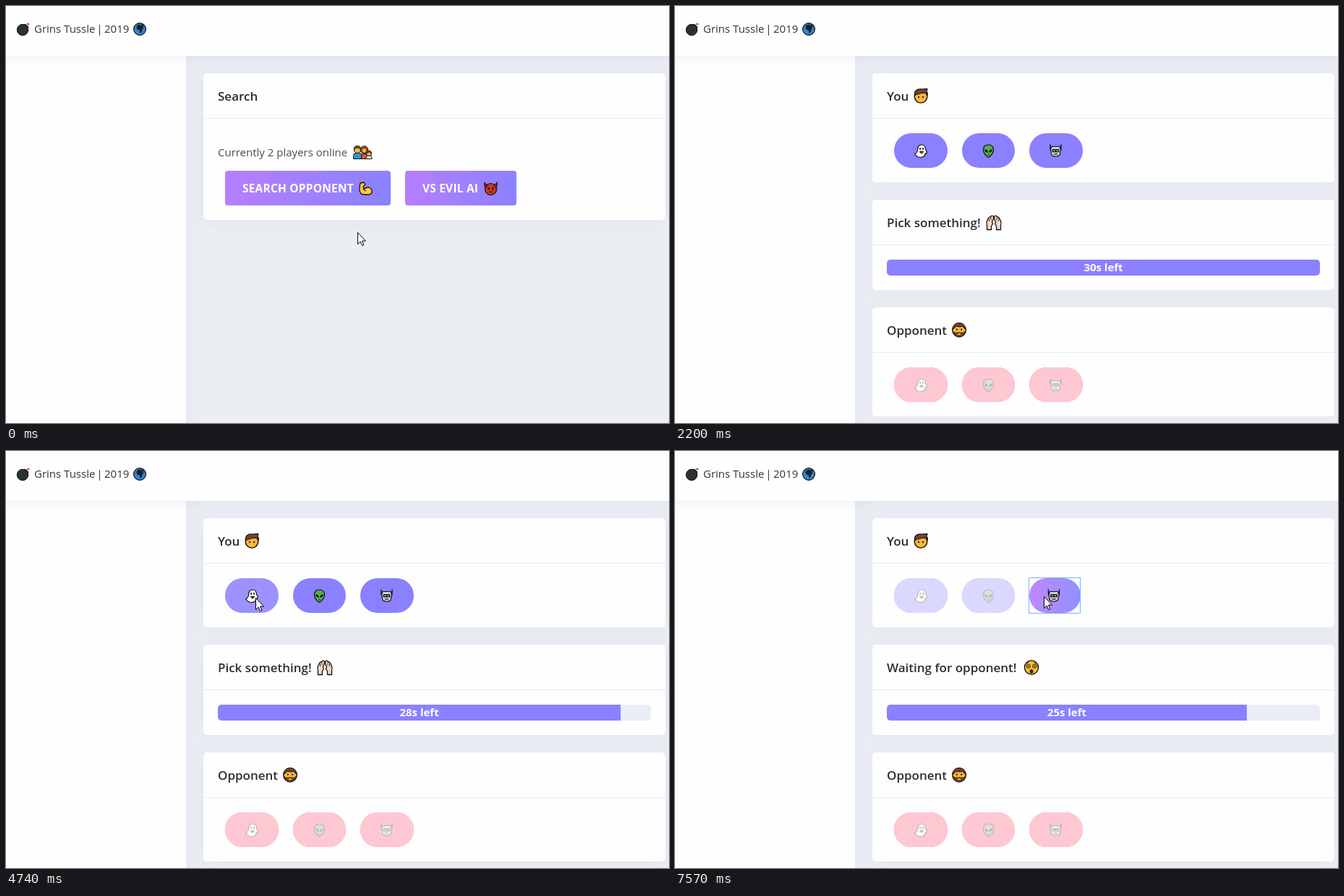
Animation of 917 by 577 pixels, one loop 8000 ms. Source, as an HTML page with a canvas:

```html
<!DOCTYPE html>
<html lang="en">
<head>
<meta charset="utf-8">
<title>Grins Tussle</title>
<style>
html, body { margin: 0; width: 100%; height: 100%; overflow: hidden; background: #fdfdfe; }
canvas { display: block; }
</style>
</head>
<body>
<canvas id="stage" width="917" height="577"></canvas>
<script>
const ctx = document.getElementById('stage').getContext('2d');
const LOOP = 8000, TICK = LOOP / 73;
const FONT = '"Open Sans", "Noto Sans", sans-serif';
const INK = '#111', WHITE = '#fefefe', PURPLE = '#8b80ff', PINK = '#ff4b6c';
const CLICK = 250, START = 1855, PICK = 7200;

const clamp = v => Math.max(0, Math.min(1, v));
const ramp = (t, from, span) => clamp((t - from) / span);

// CSS "ease" curve
function ease(x) {
  let lo = 0, hi = 1;
  for (let i = 0; i < 20; i++) {
    const s = (lo + hi) / 2;
    const bx = 3 * s * (1 - s) ** 2 * .25 + 3 * s * s * (1 - s) * .25 + s ** 3;
    if (bx < x) lo = s; else hi = s;
  }
  return 3 * lo * (1 - lo) ** 2 * .1 + 3 * lo * lo * (1 - lo) + lo ** 3;
}

// ellipse as path data
const o = (x, y, r, h = r) => `M${x - r} ${y}a${r} ${h} 0 1 0 ${2 * r} 0a${r} ${h} 0 1 0 ${-2 * r} 0z`;
const SKIN = '#ffb636', HAIR = '#70452a';

// layers: path, fill, line width, line colour
const EMOJI = {
  bomb: [
    ['M12 3l5 4-2 3-5-4z', '#2d3135', 1], [o(9, 11, 7.7), '#2d3135', 1],
    ['M14.5 5q0-3 3-2.5', 0, 1.2, '#8a5a33'], [o(17, 3, 1.6), '#d9622f']],
  globe: [
    [o(9.5, 9.5, 8.4), '#3186d6', 1.2],
    ['M6 4l4-1 3 2 2 3-2 2-1 4-2 1-1-4-3-1-1-3z', '#17231f'], ['M13 2l3 3-2 1-2-2z', '#17231f']],
  family: [
    ['M1 18.5v-4q0-4 4-4h4q4 0 4 4v4z', '#3192e0', 1], [o(6.5, 6, 4.6), SKIN, 1],
    ['M2 6q-1-5.500 4.500-5.500t4.500 5.500q-2-3-4.500-3t-4.500 3z', HAIR, .7],
    ['M12 18.500v-4q0-3 4-3t5 3v4z', '#e0532c', 1], [o(16, 6, 5.2), '#b3481f', 1], [o(16, 7, 3.3), SKIN, .6],
    ['M18.500 18.500v-2q0-3 4-3t4 3v2z', '#f4f4f4', 1], [o(22.5, 11, 3.6), SKIN, 1],
    ['M19 11q0-4 3.500-4t3.500 4q-3-3-7 0z', HAIR, .5]],
  muscle: [
    ['M2 2l5-1 2 3-3 3 1 4q3-4 7-3 5 2 4 7-1 3-6 3h-5q-5 0-6-6 0-6 1-10z', '#ffc83d', 1.3],
    ['M7 11q1 2 3 2', 0, 1]],
  devil: [
    [o(9.5, 10.5, 8), '#c83a20', 1.2],
    ['M1 .8q0 3 4 3.500l-3 4q-2-4-1-7.500zM18 .8q0 3-4 3.500l3 4q2-4 1-7.500z', '#c83a20', 1.1],
    ['M5 8l3 1.500M14 8l-3 1.500', 0, 1.1],
    [o(6.7, 10.5, 1) + o(12.3, 10.5, 1), INK], ['M7 15q2.500-2 5 0', 0, 1.1]],
  boy: [
    [o(10, 11.3, 8.8), SKIN, 1.4],
    ['M1.500 9.500q-1-9 9-8.500l8.500-.5-1 3q2 3 1 6-1-3-4-3.500-7 1-13.500 3.500z', HAIR, 1.2],
    [o(7, 12, 1, 1.3) + o(13, 12, 1, 1.3), INK]],
  beard: [
    [o(10, 10.5, 9.3), SKIN, 1.4],
    ['M1 9q1-8.500 9-8.500t9 8.500q-3-1-4-4-4 2-9 0-2 3-5 4z', HAIR, 1],
    ['M2 12.500q2 2 5 1.500 3-1 6 0 3 .5 5-1.500-1.500 7.300-8 7.300t-8-7.300z', HAIR, .6],
    [o(10, 16, 2.3, 1), SKIN], [o(6.8, 9.7, 1.1) + o(13.2, 9.7, 1.1), INK]],
  hands: [
    ['M1.500 20.500v-6q-1-3 0-6l2-4q1-2 2-1l2-2q2-1 3 1v3l-2 4 1 3-2 3v5zM20.500 20.500v-6q1-3 0-6l-2-4q-1-2-2-1l-2-2q-2-1-3 1v3l2 4-1 3 2 3v5z', '#f4d8c4', 1.3],
    ['M4.500 5v4M7 3.500v4M17.500 5v4M15 3.500v4', 0, .8]],
  dizzy: [
    [o(11, 10.5, 9.6), '#ffc02e', 1.4],
    [o(6.7, 8.7, 2.7) + o(15.3, 8.7, 2.7), 0, 1], [o(6.7, 8.7, 1) + o(15.3, 8.7, 1), INK],
    [o(11, 16, 2.1, 2.5), '#3a2415', .8], ['M5 4.500l2-1M17 4.500l-2-1', 0, 1]],
  ghost: [
    ['M1.500 14q3 0 4-5 0-7.500 5.500-7.500 5 0 5.500 6l2 4-1 2.500-1.500-.5q0 5.500-7 5.500-5-.5-7.500-5z', '#fff', 1.2],
    [o(9, 7, 1, 1.4) + o(13, 7, 1, 1.4), INK], ['M8.500 10.500h5q-.5 3-2.500 3t-2.500-3z', '#8c3030', .7]],
  alien: [
    ['M8.500 1.500q7 0 7 7 0 6-7 10.500-7-4.500-7-10.500 0-7 7-7z', '#57ad43', 1.2],
    ['M3.300 8q4.200 0 4.600 4.300-4.300 0-4.600-4.300zM13.700 8q-4.200 0-4.600 4.300 4.300 0 4.600-4.300z', INK],
    ['M7 15q1.500 1 3 0', 0, .8]],
  robot: [
    ['M1 1v7l2 2M16 1v7l-2 2', 0, 1.4], ['M3 4h11l1.500 4-1.500 8q-5.500 3.500-11 0l-1.500-8z', '#cfd1d4', 1.2],
    ['M4 8h9v3.500h-9z', '#33363c', .8], [o(6.3, 9.7, .8) + o(10.7, 9.7, .8), '#fff'],
    ['M6 14.500h5', 0, 1.2]]
};
const PICKS = ['ghost', 'alien', 'robot'];
const PILLS = [[303, 74, 330], [397, 73, 425], [490, 74, 518]];

function emoji(name, x, y) {
  ctx.save();
  ctx.translate(x, y);
  ctx.lineJoin = 'round';
  for (const [d, fill, width, line] of EMOJI[name]) {
    const path = new Path2D(d);
    if (fill) { ctx.fillStyle = fill; ctx.fill(path); }
    if (width) { ctx.lineWidth = width; ctx.strokeStyle = line || INK; ctx.stroke(path); }
  }
  ctx.restore();
}

function text(str, x, y, size, weight, color, align = 'left') {
  ctx.font = `${weight} ${size}px ${FONT}`;
  ctx.fillStyle = color;
  ctx.textAlign = align;
  ctx.fillText(str, x, y);
}

function box(x, y, w, h, r, fill) {
  ctx.beginPath();
  ctx.roundRect(x, y, w, h, r);
  ctx.fillStyle = fill;
  ctx.fill();
}

function glow(color, blur, draw) {
  ctx.save();
  ctx.shadowColor = color;
  ctx.shadowBlur = blur;
  draw();
  ctx.restore();
}

function gradient(x, w, from, to) {
  const g = ctx.createLinearGradient(x, 0, x + w, 0);
  g.addColorStop(0, from);
  g.addColorStop(1, to);
  return g;
}

const veil = (x, y, w, h, r, a) => { if (a > 0) box(x, y, w, h, r, `rgba(254,254,254,${a})`); };

function frame() {
  ctx.fillStyle = '#ebeef3';
  ctx.fillRect(0, 0, 917, 577);
  glow('rgba(120,140,200,.1)', 20, () => box(-20, 0, 269, 620, 0, WHITE));
  glow('rgba(120,140,190,.16)', 16, () => box(-20, -20, 957, 89, 0, WHITE));
  emoji('bomb', 14, 22);
  text('Grins Tussle', 39, 37, 15, 400, '#33333a');
  text('|', 129.5, 37, 15, 400, '#33333a', 'center');
  text('2019', 136, 37, 15, 400, '#33333a');
  emoji('globe', 175.5, 22.5);
}

function card(y, h, title, icon, iconX) {
  glow('rgba(120,140,200,.11)', 22, () => box(273, y, 639, h, 5, WHITE));
  ctx.fillStyle = '#e9ebf0';
  ctx.fillRect(273, y + 62, 639, 1);
  text(title, 293, y + 38, 17, 600, '#2c2c33');
  if (icon) emoji(icon, iconX, y + 21);
}

function action(x, w, label, icon, iconX, grow) {
  box(x - grow, 228 - grow, w + 2 * grow, 48 + 2 * grow, 4 - 2 * grow, gradient(x, w, '#b57eff', '#8b82ff'));
  ctx.letterSpacing = '0.2px';
  text(label, x + 24, 258, 15.5, 700, '#fff');
  ctx.letterSpacing = '0px';
  emoji(icon, iconX, 243);
}

function search(t) {
  const busy = ramp(t, CLICK, 280);
  card(93, 203, 'Search');
  text('Currently 2 players online', 293, 208, 15, 400, '#4c4c53');
  emoji('family', 479.5, 193);
  action(303, 229, 'SEARCH OPPONENT', 'muscle', 488, busy > 0 ? 1 : 0);
  action(552, 154, 'VS EVIL AI', 'devil', 661, 0);
  veil(273, 93, 639, 203, 5, .84 * busy);
  if (!busy) return;
  const turn = (t - 550) / 1000 * 2 * Math.PI;
  ctx.lineWidth = 4;
  for (const [from, to, color] of [[0, 2 * Math.PI, '#e7ebf4'], [turn - .78, turn + .78, '#d14b60']]) {
    ctx.beginPath();
    ctx.arc(555, 195, 14, from, to);
    ctx.strokeStyle = color;
    ctx.stroke();
  }
  text('Loading...', 579, 201, 15, 400, '#45343f');
}

function pill(i, y, fill, hover, fade) {
  const [x, w, iconX] = PILLS[i];
  box(x, y, w, 48, 24, fill);
  veil(x, y, w, 48, 24, .14 * hover);
  ctx.filter = fade ? `grayscale(${fade})` : 'none';
  emoji(PICKS[i], iconX, y + 14.5);
  ctx.filter = 'none';
  veil(x, y, w, 48, 24, .7 * fade);
}

// pointer enters and leaves each pill
const HOVERS = [[4390, 5100], [5130, 5620], [5850, 9000]];
const hoverAt = (i, t) => ramp(t, HOVERS[i][0], 150) - ramp(t, HOVERS[i][1], 150);

// moments when the countdown drops by a second
const DROPS = [2940, 4140, 5010, 5960, 7110];

function countdown(t) {
  let left = 30, pct = 100;
  for (const at of DROPS) {
    if (t < at) break;
    left--;
    pct += (Math.floor(left / .3) - pct) * ease(ramp(t, at, 600));
  }
  const w = 599 * pct / 100;
  ctx.save();
  ctx.beginPath();
  ctx.roundRect(293, 351, 599, 22, 5);
  ctx.clip();
  box(293, 351, 599, 22, 0, '#eaedf5');
  box(293, 351, w, 22, 0, PURPLE);
  ctx.restore();
  text(`${left}s left`, 293 + w / 2, 367, 15, 700, '#fff', 'center');
}

function game(t) {
  const picked = t >= PICK, fade = ramp(t, PICK, 300);
  card(93, 151, 'You', 'boy', 330);
  pill(0, 176, PURPLE, hoverAt(0, t), fade);
  pill(1, 176, PURPLE, hoverAt(1, t), fade);
  if (picked) {
    box(490, 176, 71, 48, 24, gradient(490, 71, '#bd89fb', '#938fff'));
    emoji('robot', 515.5, 190.5);
    ctx.lineWidth = 1;
    ctx.strokeStyle = '#73b2ff';
    ctx.strokeRect(489.5, 175.5, 71, 49);
  } else pill(2, 176, PURPLE, hoverAt(2, t), 0);

  if (picked) card(268, 125, 'Waiting for opponent!', 'dizzy', 482);
  else card(268, 125, 'Pick something!', 'hands', 430);
  countdown(t);

  card(417, 151, 'Opponent', 'beard', 383);
  for (let i = 0; i < 3; i++) pill(i, 500, PINK, 0, 1);

  const hidden = .84 * (1 - ramp(t, START, 300));
  for (const [y, h] of [[93, 151], [268, 125], [417, 151]]) veil(273, y, 639, h, 5, hidden);
}

// time, x, y; the pointer is outside the stage between the two trips
const TRIPS = [
  [[0, 486, 313], [100, 486, 313], [240, 475, 261], [1000, 475, 261], [1320, 380, 268], [1640, 85, 298], [1700, 85, 298]],
  [[3270, 113, 300], [3500, 330, 262], [3730, 425, 239], [3830, 426, 237], [4160, 426, 237], [4480, 345, 203],
   [4950, 345, 203], [5260, 414, 200], [5480, 414, 200], [5820, 486, 203], [6130, 510, 201], [LOOP, 510, 201]]
];
const ARROW = new Path2D('M.5.5v16l3.700-3.500 2.400 5.500 2.300-1-2.400-5.400h5z');

function pointer(t) {
  for (const trip of TRIPS) {
    const i = trip.findIndex(p => p[0] > t);
    if (i < 1) continue;
    const [a, x, y] = trip[i - 1], [b, x2, y2] = trip[i];
    const k = (t - a) / (b - a);
    ctx.save();
    ctx.translate(Math.round(x + (x2 - x) * k), Math.round(y + (y2 - y) * k));
    ctx.fillStyle = '#fff';
    ctx.fill(ARROW);
    ctx.lineWidth = 1;
    ctx.strokeStyle = '#000';
    ctx.stroke(ARROW);
    ctx.restore();
  }
}

let begin;
function draw(now) {
  begin ??= now;
  // time advances in even ticks
  const t = Math.floor((now - begin) % LOOP / TICK) * TICK;
  frame();
  if (t < START) search(t); else game(t);
  pointer(t);
  requestAnimationFrame(draw);
}
requestAnimationFrame(draw);
</script>
</body>
</html>
```
